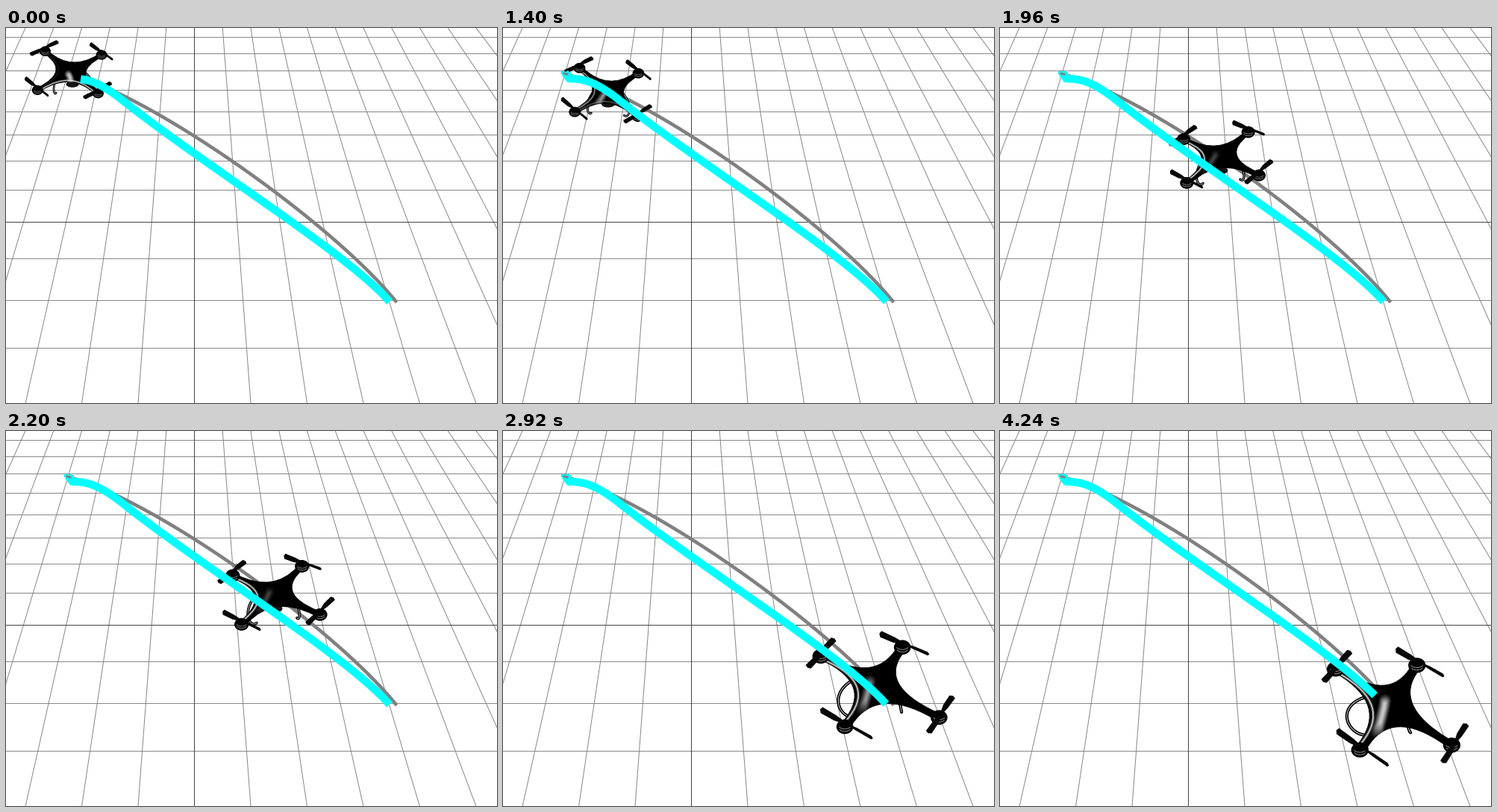
Recreate the animation shown at these times as a matplotlib script. Size 658 by 503 pixels, loop 4520 ms.

```python
import numpy as np
import matplotlib.pyplot as plt
from matplotlib.animation import FuncAnimation
from matplotlib.patches import Ellipse, PathPatch, Polygon
from matplotlib.path import Path

W, H, DPI = 658, 503, 64
PT = 72 / DPI
STEP, FRAMES = 40, 113

# Camera looking down on the ground grid
TILT = np.radians(53)
SIN, COS = np.sin(TILT), np.cos(TILT)
FOCAL, DIST, SHIFT = 573, 10, -0.0716
CX, CY = 252.5, 256.5

ARM, RISE, YAW = 0.9, 0.7, np.radians(3)
DEPART, ARRIVE = 1080, 3320


def project(m, n, h=0.0):
    """Ground position (right, away) and height to stage pixels."""
    d = DIST + n * COS - h * SIN
    return np.array([CX + FOCAL * m / d,
                     CY - FOCAL * (n * SIN + h * COS + SHIFT) / d])


def ground_at(x, y):
    """Ground position seen at a stage pixel."""
    q = (CY - y) / FOCAL
    n = (q * DIST - SHIFT) / (SIN - q * COS)
    return (x - CX) * (DIST + n * COS) / FOCAL, n


def smoothstep(s):
    s = np.clip(s, 0, 1)
    return s * s * (3 - 2 * s)


def ease(t, *keys):
    """Ease between (time, value) keys."""
    value = keys[0][1]
    for (t0, _), (t1, v1) in zip(keys, keys[1:]):
        value += (v1 - value) * smoothstep((t - t0) / (t1 - t0))
    return value


def bezier(*points):
    s = np.linspace(0, 1, 300)[:, None]
    a, b, c, d = np.array(points, float)
    return (1 - s) ** 3 * a + 3 * s * (1 - s) ** 2 * b + 3 * s * s * (1 - s) * c + s ** 3 * d


PLANNED = bezier((84, 62), (192, 88), (440, 263), (523.5, 368))
FLOWN = np.vstack([
    [(83, 60)],
    bezier((89, 68), (112, 67.5), (128, 76), (150, 92)),
    bezier((150, 92), (262, 182), (458, 302), (514, 367)),
])

fig = plt.figure(figsize=(W / DPI, H / DPI), dpi=DPI, facecolor="white")
ax = fig.add_axes([0, 0, 1, 1])
ax.set(xlim=(0, W), ylim=(H, 0))
ax.axis("off")


def draw_grid():
    for k in range(-14, 26):
        style = dict(color="#444444" if k == 0 else "#888888", lw=PT,
                     zorder=1.1 if k == 0 else 1, snap=False)
        ax.plot(*np.transpose([project(k, -4.5), project(k, 12)]), **style)
        if -4 < k < 9:
            y = np.floor(project(0, k)[1]) + .5
            ax.plot([-5, W + 5], [y, y], **style)


draw_grid()
ax.plot(*PLANNED.T, color="#808080", lw=4.6 * PT, zorder=2, solid_capstyle="butt")
flown, = ax.plot([], [], color="cyan", lw=10.5 * PT, zorder=9,
                 solid_capstyle="butt", solid_joinstyle="round")
tip, = ax.plot([80, 89], [60, 61], color="cyan", lw=4 * PT, zorder=9)
dot, = ax.plot([82, 86], [61, 62], color="#808080", lw=3 * PT, zorder=10)
parts = []


class Drone:
    """Places body coordinates (u right, v near, z up) in the scene."""

    def __init__(self, t):
        run = np.clip((t - DEPART) / (ARRIVE - DEPART), 0, 1)
        x = 87 + 436 * smoothstep(run ** .78)
        sag = ease(t, (560, -4), (DEPART, 6), (1680, 0))
        self.m, self.n = ground_at(x, np.interp(x, *PLANNED.T) + sag)
        # Leans into the start, then leans back to brake
        self.lean = np.sin(np.radians(
            ease(t, (560, 6), (DEPART, 12), (2200, -8), (ARRIVE, -7), (3880, 0))))
        self.front = ease(t, (560, 1), (DEPART, .8), (1680, 0))
        self.glow = ease(t, (DEPART, .9), (1680, .2), (2560, .2), (ARRIVE, .9))
        self.s = FOCAL * ARM / (DIST + self.n * COS) / 58

    def pos(self, u, v, z=0.0):
        u, v, z, k = u * ARM, v * ARM, z * RISE, self.lean
        right, near, up = u + z * k, v + z * k, z - (u + v) * k
        c, s = np.cos(YAW), np.sin(YAW)
        return project(self.m + right * c + near * s,
                       self.n + right * s - near * c, up)

    def add(self, patch):
        parts.append(ax.add_patch(patch))
        return patch

    def stroke(self, verts, codes, color, width, z, alpha=1.0, clip=None):
        p = self.add(PathPatch(Path(verts, codes), fill=False, ec=color,
                               lw=width * self.s * PT, alpha=alpha, zorder=z,
                               capstyle="round"))
        if clip is not None:
            p.set_clip_path(clip)

    def oval(self, c, w, h, color, z):
        self.add(Ellipse(c, w * self.s, h * self.s, fc=color, ec="none", zorder=z))

    def gear(self):
        codes = [Path.MOVETO] + [Path.CURVE4] * 3
        for side in (-1, 1):
            verts = [self.pos(side * u, v, z) for u, v, z in (
                (.3, -.3, -.1), (.92, -.55, -1.2), (.75, .2, -1.35), (.55, .45, -.75))]
            self.stroke(verts, codes, "black", 4.2, 3)
            self.stroke(verts, codes, "white", .8, 3.1)
        self.oval(self.pos(0, .1, -.6), 26, 13, "#151515", 3.2)

    def body(self):
        verts, codes = [], []
        for c, s in ((1, 0), (0, 1), (-1, 0), (0, -1)):
            for u, v in ((-.85, .98), (0, .05), (.85, .98)):
                verts.append(self.pos(u * c + v * s, u * s - v * c))
            codes += [Path.LINETO if codes else Path.MOVETO, Path.CURVE3, Path.CURVE3]
        shell = self.add(PathPatch(Path(verts, codes), fc="black", ec="black",
                                   lw=self.s * PT, zorder=5))
        self.shine(shell)

    def shine(self, shell):
        b = self.front
        codes = [Path.MOVETO, Path.CURVE3, Path.CURVE3]
        a = self.pos(-.08, -.12 + .25 * b)
        mid = self.pos(-.2 + .2 * b, .15 + .1 * b)
        e = self.pos(-.52 + .55 * b, .65 - .2 * b)
        for k in range(9):
            f = k / 8
            self.stroke([a + (mid - a) * .3 * f, mid, e + (mid - e) * .5 * f], codes,
                        "white", 17 - 14 * f, 5.1, self.glow * (.07 + .2 * f), shell)
        rims = [(.8 - .7 * b, [(-.91, -.84), (.05, 0), (-.91, .84)]),
                (.8 * b, [(-.84, .91), (0, -.05), (.84, .91)])]
        for power, points in rims:
            verts = [self.pos(*p) for p in points]
            for width, alpha in ((4.5, .25), (1.8, .9)):
                self.stroke(verts, codes, "white", width, 5.2, power * alpha, shell)

    def motor(self, c):
        self.oval(c, 23, 20, "black", 6)
        a = np.linspace(.15, .85, 12) * np.pi
        for r, dy in ((8.5, -2), (8, 1.5)):
            arc = c + self.s * np.c_[r * np.cos(a), dy + .6 * r * np.sin(a)]
            self.stroke(arc, None, "#cfcfcf", .9, 6.1, .75)

    def blade(self, hub, end, width):
        d = end - hub
        n = np.array([-d[1], d[0]]) / np.hypot(*d) * width * self.s / 2
        self.add(Polygon([hub - .3 * n, hub + .4 * d - n, hub + .92 * d - n, end,
                          hub + .96 * d + n, hub + .4 * d + .8 * n, hub + .3 * n],
                         fc="#080808", ec="none", zorder=7))

    def props(self):
        for u in (-1, 1):
            for v in (-1, 1):
                self.motor(self.pos(u, v))
                hub = self.pos(u, v, .18)
                for way in (-1, 1):
                    end = self.pos(u + way * .44, v - way * u * v * .41, .18)
                    thin = u != v and way > 0
                    self.blade(hub, end, 4.5 if thin else 8.5)
                self.oval(hub, 9, 7, "black", 7.1)


def draw(i):
    t = i * STEP
    for p in parts:
        p.remove()
    parts.clear()
    drone = Drone(t)
    drone.gear()
    drone.body()
    drone.props()
    # The shell hides the path where it enters the body
    lo = ease(t, (560, 100), (DEPART, 92), (1400, 82))
    hi = ease(t, (2560, 515), (ARRIVE, 512), (3880, 503))
    x = FLOWN[:, 0]
    flown.set_data(*FLOWN[(x >= lo) & (x <= hi)].T)
    tip.set_visible(t >= 900)
    dot.set_visible(t >= 1300)
    return []


anim = FuncAnimation(fig, draw, frames=FRAMES, interval=STEP, repeat=True,
                     init_func=lambda: [], cache_frame_data=False)
plt.show()
```
